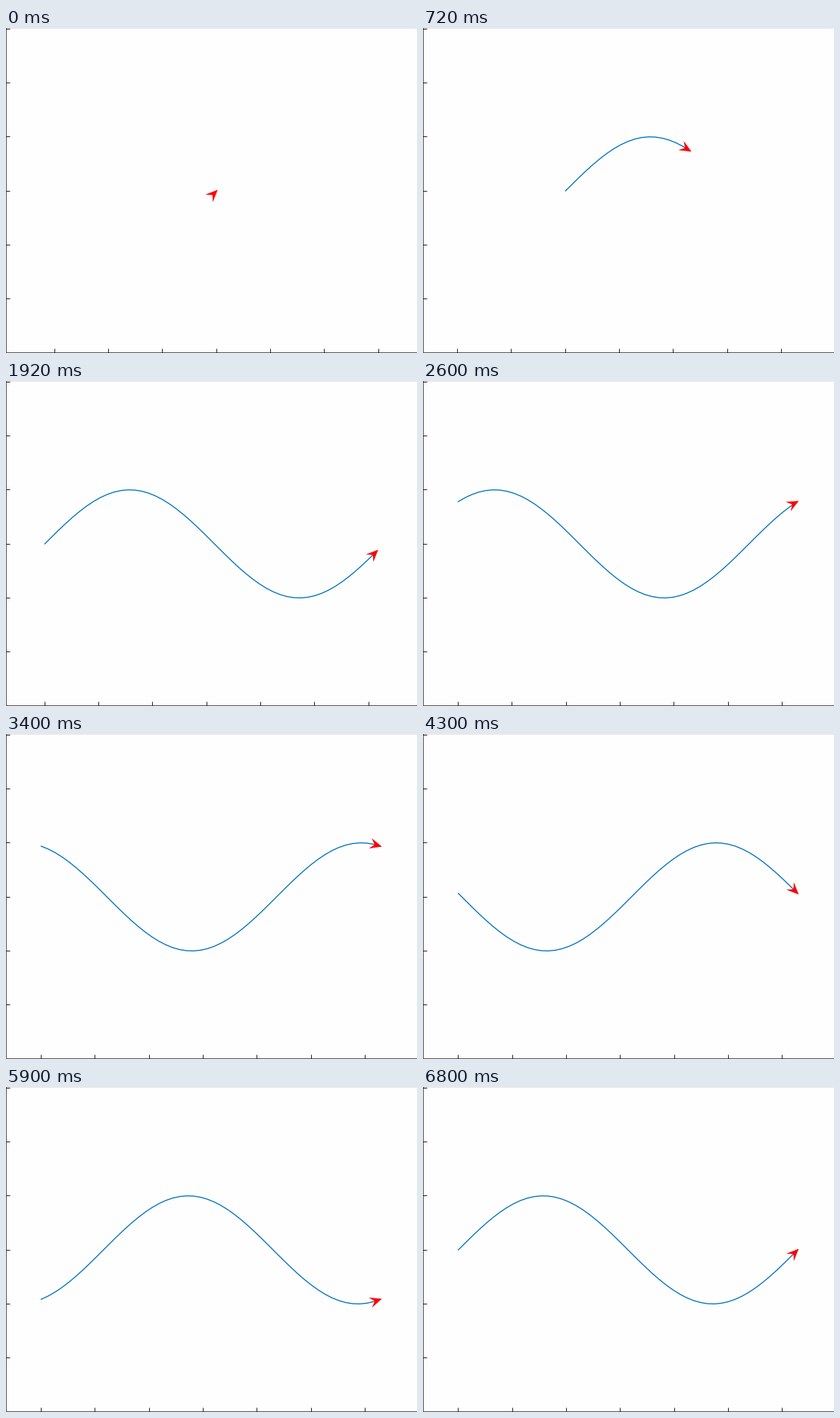
Animation of 543 by 429 pixels, one loop 6.9 s. Source, as a matplotlib script:

```python
import numpy as np
import matplotlib.pyplot as plt
from matplotlib.animation import FuncAnimation
from matplotlib.patches import Polygon

W, H, DPI = 543, 429, 100
PX = 72 / DPI               # one pixel in points
UNIT = 428 / 6              # pixels per data unit
MID_X, MID_Y = 271.5, 215
TAU = 2 * np.pi
N = 50
STEP = TAU / (N - 1)
TICK = 5.5
INK = "#262626"
TICK_MS = 20
LOOP_MS = 6900

# arrow head pointing right, in pixels from the leading point
HEAD = np.array([(2, 0), (-14, 7), (-7.8, 0), (-14, -7)])

fig = plt.figure(figsize=(W / DPI, H / DPI), dpi=DPI, facecolor="#fefefe")
ax = fig.add_axes([0, 0, 1, 1])
ax.set(xlim=(0, W), ylim=(H, 0))
ax.axis("off")


def segment(xs, ys, color=INK):
    return ax.plot(xs, ys, color=color, lw=PX, solid_capstyle="butt",
                   snap=False, zorder=1)[0]


segment([0, W], [0.5, 0.5], "#e6e6e6")
segment([0.5, 0.5], [0, H], "#5a5a5a")
segment([0, W], [H - 0.5, H - 0.5], "#5a5a5a")
for k in range(-2, 4):
    y = np.floor(MID_Y - k * UNIT) + 0.5
    segment([0, TICK], [y, y])

x_ticks = [segment([], []) for _ in range(9)]
curve, = ax.plot([], [], color="#0072bd", lw=1.3 * PX, zorder=2)
head = Polygon(HEAD, closed=True, fc="red", ec="none", zorder=3)
ax.add_patch(head)


def step_at(ms):
    """40 ms steps while the curve grows, then 100 ms steps."""
    return ms // 40 if ms < 2000 else 50 + (ms - 2000) // 100


def draw(i):
    n = step_at(i * TICK_MS)
    last = min(n, N - 1)
    x = np.arange(last + 1) * STEP
    phase = (n - last) * STEP
    y = np.sin(x + phase)

    a = np.pi / 4 * np.cos(x[-1] + phase)
    c, s = np.cos(a), np.sin(a)
    arrow = HEAD @ np.array([[c, -s], [s, c]])
    arrow += (x[-1] * UNIT, MID_Y - y[-1] * UNIT)

    # the view stays centred on everything drawn
    lo = min(0, arrow[:, 0].min())
    hi = arrow[:, 0].max()
    x0 = MID_X - (lo + hi) / 2

    curve.set_data(x0 + x * UNIT, MID_Y - y * UNIT)
    head.set_xy(arrow + (x0, 0))
    first = x0 % UNIT
    for k, tick in enumerate(x_ticks):
        tx = np.floor(first + k * UNIT) + 0.5
        tick.set_data([tx, tx], [H - TICK, H])
    return [curve, head, *x_ticks]


anim = FuncAnimation(fig, draw, frames=LOOP_MS // TICK_MS, interval=TICK_MS,
                     repeat=True, repeat_delay=0, blit=False)
plt.show()
```
